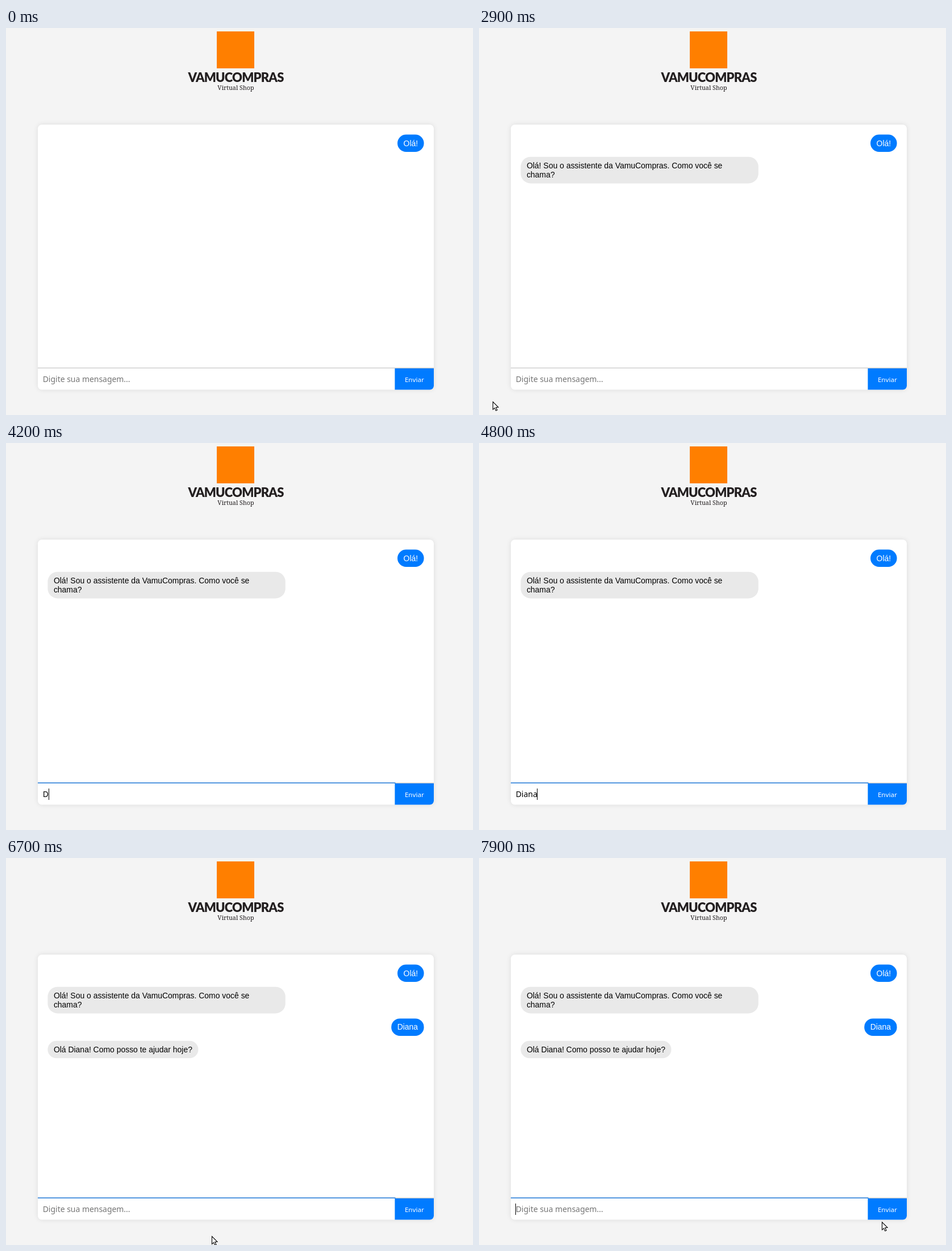
Animation of 822 by 681 pixels, one loop 8000 ms. Source, as an HTML page with a canvas:

```html
<!DOCTYPE html>
<html lang="pt-BR">
<head>
<meta charset="utf-8">
<title>Chat</title>
<style>
  html, body { margin: 0; width: 100%; height: 100%; overflow: hidden; background: #f4f4f4; }
  canvas { display: block; }
</style>
</head>
<body>
<canvas id="stage" width="822" height="681"></canvas>
<script>
const ctx = document.getElementById('stage').getContext('2d');
const LOOP = 8000;
const CHAT_FONT = '13.94px "Liberation Sans", Arial, sans-serif';
const INPUT_FONT = '13.94px "Noto Sans", sans-serif';
const BLUE = '#007bff';
const CARD = { x: 56, y: 170, w: 697, h: 466.5, r: 7 };
const INPUT_X = 64.7;
const FOCUS_AT = 3600, SENT_AT = 5100, REPLY_AT = 6300;

const messages = [
  { at: 0, mine: true, y: 187.5, h: 30.5, lines: ['Olá!'] },
  { at: 1200, y: 226.7, h: 46.7, w: 418.4,
    lines: ['Olá! Sou o assistente da VamuCompras. Como você se', 'chama?'] },
  { at: SENT_AT, mine: true, y: 282.4, h: 30.5, lines: ['Diana'] },
  { at: REPLY_AT, y: 321.7, h: 30.5, lines: ['Olá Diana! Como posso te ajudar hoje?'] }
];

const typing = [[0, ''], [4200, 'D'], [4500, 'Dia'], [4700, 'Dian'], [4800, 'Diana'], [SENT_AT, '']];

// [time, shape, x, y]; the pointer jumps from place to place
const pointer = [
  [0, null],
  [2900, 'arrow', 24, 657], [3000, 'arrow', 34, 651], [3100, 'arrow', 50, 642],
  [3200, 'beam', 71, 632], [3300, 'beam', 82, 629], [3500, 'beam', 82, 628],
  [4200, null],
  [6400, 'arrow', 95, 640], [6500, 'arrow', 155, 657], [6600, 'arrow', 250, 667],
  [6700, 'arrow', 362, 665], [6800, 'arrow', 467, 659], [6900, 'arrow', 563, 653],
  [7000, 'arrow', 657, 656], [7100, 'arrow', 740, 658], [7200, 'arrow', 765, 657],
  [7800, 'arrow', 732, 647], [7900, 'arrow', 709, 640]
];

const latest = (steps, t) => steps.findLast(step => step[0] <= t);

function box(x, y, w, h, r, color) {
  ctx.fillStyle = color;
  ctx.beginPath();
  ctx.roundRect(x, y, w, h, r);
  ctx.fill();
}

function rect(x, y, w, h, color) {
  ctx.fillStyle = color;
  ctx.fillRect(x, y, w, h);
}

function text(str, x, y, font, color, align = 'left') {
  ctx.font = font;
  ctx.fillStyle = color;
  ctx.textAlign = align;
  ctx.fillText(str, x, y);
}

function drawHeader() {
  rect(371, 6, 66, 65, '#ff7f00');
  ctx.letterSpacing = '-0.8px';
  text('VAMUCOMPRAS', 404.5, 95, '900 22px Lato, sans-serif', '#231f20', 'center');
  ctx.letterSpacing = '0px';
  text('Virtual Shop', 404.5, 109, '10.8px "Noto Serif", serif', '#231f20', 'center');
}

function drawMessage({ mine, y, h, w, lines }) {
  const pad = 10.5;
  ctx.font = CHAT_FONT;
  const width = w || ctx.measureText(lines[0]).width + 2 * pad;
  const x = mine ? 735.6 - width : 73.4;
  box(x, y, width, h, Math.min(17.4, h / 2), mine ? BLUE : '#e9e9e9');
  lines.forEach((line, i) =>
    text(line, x + pad, y + 20 + i * 16.3, CHAT_FONT, mine ? '#fff' : '#000'));
}

function drawInput(t) {
  const value = latest(typing, t)[1];
  const focused = t >= FOCUS_AT;

  ctx.save();
  ctx.beginPath();
  ctx.roundRect(CARD.x, CARD.y, CARD.w, CARD.h, CARD.r);
  ctx.clip();
  rect(CARD.x, 597.6, CARD.w, 1.4, '#ccc');
  rect(684.4, 599, 69, 38, BLUE);
  if (focused) rect(CARD.x, 597.4, 629.5, 1.6, '#2f83dd');
  ctx.restore();

  text('Enviar', 718.8, 622.7, '11.6px "Noto Sans", sans-serif', '#fff', 'center');
  text(value || 'Digite sua mensagem...', INPUT_X, 623.4, INPUT_FONT, value ? '#000' : '#757575');

  const caretOn = focused && (t < 5900 || t >= 7000);
  if (caretOn) {
    const x = Math.floor(INPUT_X + 0.2 + ctx.measureText(value).width);
    rect(x, 608, 1, 20, '#000');
  }
}

function polygon(points) {
  ctx.beginPath();
  points.forEach(([x, y]) => ctx.lineTo(x, y));
  ctx.closePath();
}

function drawArrow() {
  polygon([[.5, .8], [.5, 14.3], [3.5, 11.6], [5.7, 16.4], [8, 15.4], [5.8, 10.7], [10, 10.3]]);
  ctx.fillStyle = '#fff';
  ctx.strokeStyle = '#000';
  ctx.lineWidth = 1.1;
  ctx.fill();
  ctx.stroke();
}

function drawBeam() {
  for (const [color, width] of [['#fff', 3.2], ['#000', 1.6]]) {
    ctx.strokeStyle = color;
    ctx.lineWidth = width;
    ctx.beginPath();
    ctx.moveTo(-3, -6);
    ctx.lineTo(3, -6);
    ctx.moveTo(0, -6);
    ctx.lineTo(0, 6);
    ctx.moveTo(-3, 6);
    ctx.lineTo(3, 6);
    ctx.stroke();
  }
}

function drawPointer(t) {
  const [, shape, x, y] = latest(pointer, t);
  if (!shape) return;
  ctx.save();
  ctx.translate(x, y);
  if (shape === 'arrow') drawArrow();
  else drawBeam();
  ctx.restore();
}

function draw(now) {
  const t = now % LOOP;
  rect(0, 0, 822, 681, '#f4f4f4');
  drawHeader();

  ctx.shadowColor = 'rgba(0, 0, 0, 0.1)';
  ctx.shadowBlur = 8.7;
  box(CARD.x, CARD.y, CARD.w, CARD.h, CARD.r, '#fff');
  ctx.shadowColor = 'transparent';

  messages.filter(m => t >= m.at).forEach(drawMessage);
  drawInput(t);
  drawPointer(t);
  requestAnimationFrame(draw);
}
requestAnimationFrame(draw);
</script>
</body>
</html>
```
